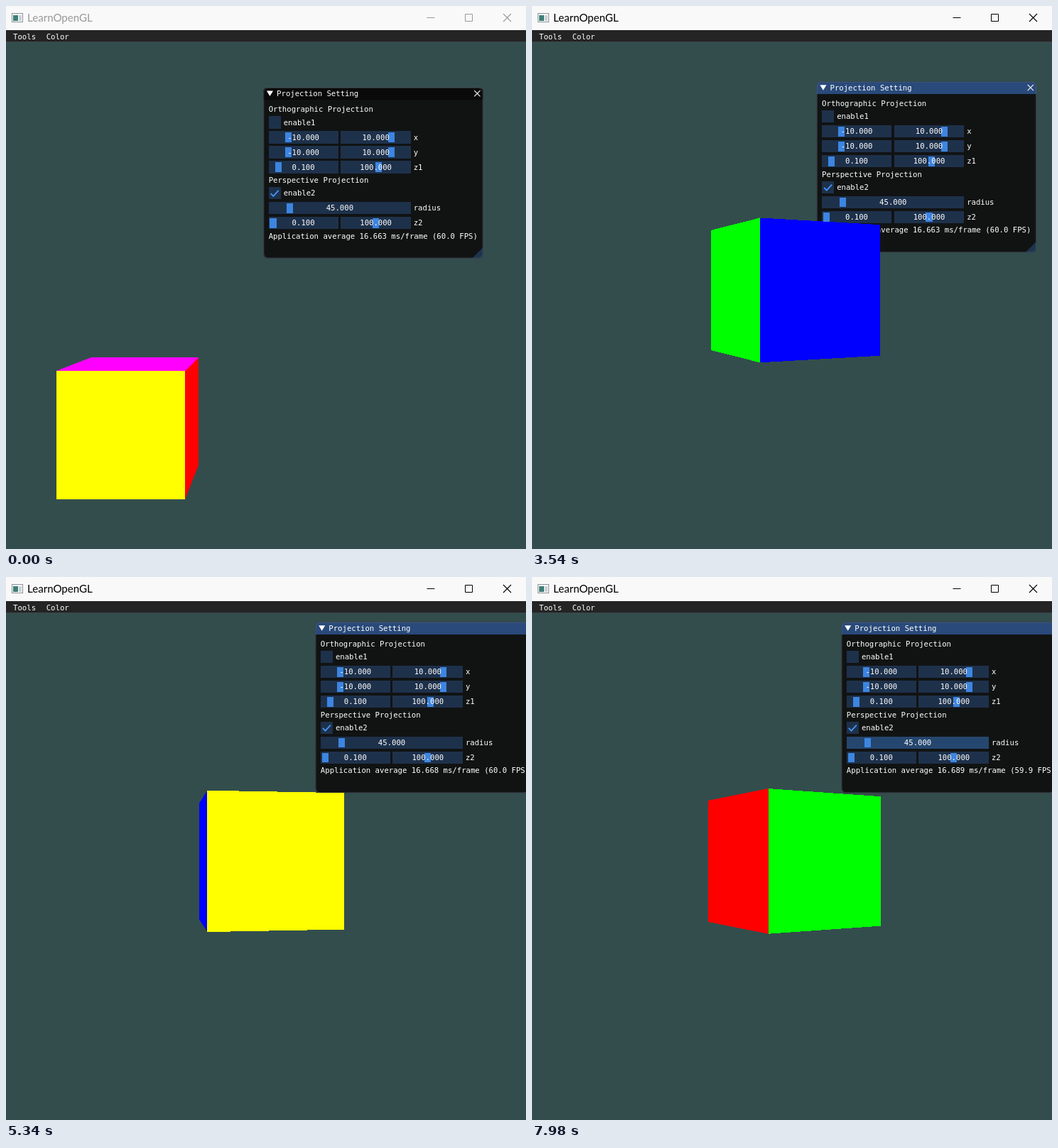
Animation, 732 px wide and 765 px high, one loop 8 s. Source, as an HTML page:

```html
<!DOCTYPE html>
<html lang="en">
<head>
<meta charset="utf-8">
<title>LearnOpenGL</title>
<style>
  html, body { margin: 0; width: 100%; height: 100%; overflow: hidden; background: #334d4d; }
  svg { display: block; width: 732px; height: 765px; }
  .ui { font: 11.63px "DejaVu Sans Mono", "Liberation Mono", monospace; fill: #fff; white-space: pre; }
  .caption { font: 15.1px Lato, "Open Sans", sans-serif; }
  .crisp { shape-rendering: crispEdges; }
</style>
</head>
<body>
<svg id="stage" viewBox="0 0 732 765" xmlns="http://www.w3.org/2000/svg"></svg>
<script>
const LOOP = 8000, STEP = 60;
const SCALE = 0.915, BAR = 34.4;        // interface pixels to stage pixels, caption height
const HOME = { x: 396, y: 88 }, PANEL_W = 338, PANEL_H = 263;
const ORBIT_START = 1800;
const FRAME = "#1e314b", FRAME_HOT = "#25476f";

const stage = document.getElementById("stage");

function add(parent, tag, attrs, text) {
  const node = document.createElementNS("http://www.w3.org/2000/svg", tag);
  for (const key in attrs) node.setAttribute(key, attrs[key]);
  if (text !== undefined) node.textContent = text;
  parent.appendChild(node);
  return node;
}
const rect = (p, x, y, width, height, fill, more) =>
  add(p, "rect", { x, y, width, height, fill, ...more });
const block = (p, x, y, width, height, fill) =>
  rect(p, x, y, width, height, fill, { class: "crisp" });
const label = (p, x, top, text, anchor = "start") =>
  add(p, "text", { class: "ui", x, y: top + 10.5, "text-anchor": anchor }, text);
const line = (p, d, stroke, width = 1) =>
  add(p, "path", { d, stroke, "stroke-width": width, fill: "none" });

block(stage, 0, 0, 732, 765, "#334d4d");

// Window caption
block(stage, 0, 0, 732, 34, "#f9f9f9");
const icon = add(stage, "g", {});
rect(icon, 8.5, 10.5, 15, 12, "#fff", { stroke: "#8a9299" });
rect(icon, 10, 13, 7, 8, "#3f7f78");
rect(icon, 18, 13, 4, 8, "#c9d2d6");
const caption = add(stage, "text", { class: "caption", x: 30, y: 22 }, "LearnOpenGL");
const buttons = [
  line(stage, "M592.5 16.5H603.5", ""),
  line(stage, "M646.5 11.5H656.5V21.5H646.5Z", ""),
  line(stage, "M700 11L711 22M711 11L700 22", "", 1.1)
];

// Menu bar
const app = add(stage, "g", { transform: `translate(0 ${BAR}) scale(${SCALE})` });
block(app, 0, 0, 800, 18.4, "#242424");
block(app, 0, 17.3, 800, 1.1, "#3c4347");
const menuHot = block(app, 3, 1, 51, 17, "#3c7fcf");
label(app, 11, 3, "Tools");
label(app, 62, 3, "Color");

// Settings panel
const panel = add(app, "g", {});
rect(panel, 0, 0, PANEL_W, PANEL_H, "#111313", { rx: 7 });
const titleBar = add(panel, "path", { d: `M0 19V7Q0 0 7 0H${PANEL_W - 7}Q${PANEL_W} 0 ${PANEL_W} 7V19Z` });
add(panel, "path", {
  d: `M${PANEL_W} ${PANEL_H - 17}V${PANEL_H - 7}Q${PANEL_W} ${PANEL_H} ${PANEL_W - 7} ${PANEL_H}H${PANEL_W - 17}Z`,
  fill: "#1d344d"
});
rect(panel, 0.5, 0.5, PANEL_W - 1, PANEL_H - 1, "none", { rx: 7, stroke: "#6e6e80", "stroke-opacity": 0.5 });
add(panel, "path", { d: "M5 5H15L10 13.2Z", fill: "#fff" });
label(panel, 20.5, 3, "Projection Setting");
line(panel, "M324.5 4.5L333.5 13.5M333.5 4.5L324.5 13.5", "#fff", 1.2);

function slider(x, y, width, grab, value) {
  const frame = block(panel, x, y, width, 19, FRAME);
  block(panel, grab, y + 2, 10, 15, "#3d85e0");
  label(panel, x + width / 2, y + 3, value, "middle");
  return frame;
}
function pair(y, name, grabs, values) {
  label(panel, 231, y + 3, name);
  return [slider(8, y, 107, grabs[0], values[0]), slider(119, y, 108, grabs[1], values[1])];
}
function checkbox(y, name) {
  label(panel, 31, y + 3, name);
  return block(panel, 8, y, 19, 19, FRAME);
}

label(panel, 8, 27, "Orthographic Projection");
checkbox(44, "enable1");
const xRow = pair(67, "x", [33, 191.5], ["-10.000", "10.000"]);
const yRow = pair(90, "y", [33, 191.5], ["-10.000", "10.000"]);
const zRow = pair(113, "z1", [18, 172], ["0.100", "100.000"]);
label(panel, 8, 136, "Perspective Projection");
const enable2 = checkbox(153, "enable2");
line(panel, "M11.3 163L15.3 167.2L23.3 158.5", "#4296fa", 2);
const radius = slider(8, 176, 219, 35.5, "45.000");
label(panel, 231, 179, "radius");
pair(199, "z2", [10, 168], ["0.100", "100.000"]);
const stats = label(panel, 8, 222, "");

// Widgets under the pointer: node, from, to
const hovers = [
  [xRow[1], 5700, 5880], [yRow[1], 5880, 6000], [zRow[1], 6000, 6300],
  [enable2, 7740, 7860], [radius, 7860, LOOP]
];

// Frame time readings: start, milliseconds
const readings = [
  [0, 16.663], [60, 16.664], [240, 16.662], [360, 16.665], [480, 16.663], [600, 16.664],
  [1020, 16.702], [1320, 16.788], [1800, 16.801], [2640, 16.671], [3480, 16.663],
  [5160, 16.668], [5940, 16.675], [6840, 16.663], [7680, 16.681], [7920, 16.689]
];

// Panel drag: time, dx, dy in interface pixels
const drag = [
  [3360, 0, 0], [3420, 4, 0], [3480, 21, -4], [3540, 42, -9], [3720, 63, -15],
  [3900, 72, -28], [4080, 77, -44], [4260, 79, -54], [4380, 80, -56]
];

function dragAt(t) {
  const i = drag.findIndex(k => k[0] > t);
  if (i === 0) return [0, 0];
  if (i < 0) return drag[drag.length - 1].slice(1);
  const a = drag[i - 1], b = drag[i], u = (t - a[0]) / (b[0] - a[0]);
  return [1, 2].map(j => Math.round(a[j] + (b[j] - a[j]) * u));
}

// Cube, drawn over the panel
const corner = add(stage, "g", { class: "crisp" });
[["#f0f", "71,514 120,495 271,495 252,514"],
 ["#f00", "252,514 271,495 271,647 252,695"],
 ["#ff0", "71,514 252,514 252,695 71,695"]]
  .forEach(([fill, points]) => add(corner, "polygon", { fill, points }));

const orbit = add(stage, "g", { class: "crisp" });
const sides = ["#0f0", "#00f", "#ff0", "#f00"].map(fill => add(orbit, "polygon", { fill }));
const FOCAL = 365.5 / Math.tan(Math.PI / 8);   // 45 degree field of view
const DISTANCE = 5;                            // in cube edges
const CENTER = { x: 365.6, y: 400.4 };

function edgeAt(angle) {
  const k = FOCAL / (DISTANCE - Math.SQRT1_2 * Math.cos(angle));
  return {
    x: CENTER.x + Math.SQRT1_2 * Math.sin(angle) * k,
    top: CENTER.y - k / 2,
    bottom: CENTER.y + k / 2
  };
}

function drawOrbit(t) {
  const turn = -0.0757 - (t - ORBIT_START) / 960;
  sides.forEach((side, i) => {
    const a = edgeAt(turn + i * Math.PI / 2);
    const b = edgeAt(turn + (i + 1) * Math.PI / 2);
    side.setAttribute("points",
      `${a.x},${a.top} ${b.x},${b.top} ${b.x},${b.bottom} ${a.x},${a.bottom}`);
    side.style.display = a.x < b.x ? "" : "none";
  });
}

function draw(time) {
  const t = Math.floor((time % LOOP) / STEP) * STEP;
  const active = t >= 1020;
  caption.setAttribute("fill", active ? "#000" : "#999");
  buttons.forEach(b => b.setAttribute("stroke", active ? "#000" : "#999"));
  menuHot.style.display = t >= 1320 && t < ORBIT_START ? "" : "none";

  const [dx, dy] = dragAt(t);
  panel.setAttribute("transform", `translate(${HOME.x + dx} ${HOME.y + dy})`);
  titleBar.setAttribute("fill", t >= 2520 ? "#294a7a" : "#0a0a0a");
  hovers.forEach(([node, from, to]) =>
    node.setAttribute("fill", t >= from && t < to ? FRAME_HOT : FRAME));

  const ms = readings.filter(r => r[0] <= t).pop()[1];
  stats.textContent = `Application average ${ms.toFixed(3)} ms/frame (${(1000 / ms).toFixed(1)} FPS)`;

  const orbiting = t >= ORBIT_START;
  corner.style.display = orbiting ? "none" : "";
  orbit.style.display = orbiting ? "" : "none";
  if (orbiting) drawOrbit(t);
}

function tick() {
  draw(performance.now());
  requestAnimationFrame(tick);
}
tick();
</script>
</body>
</html>
```
